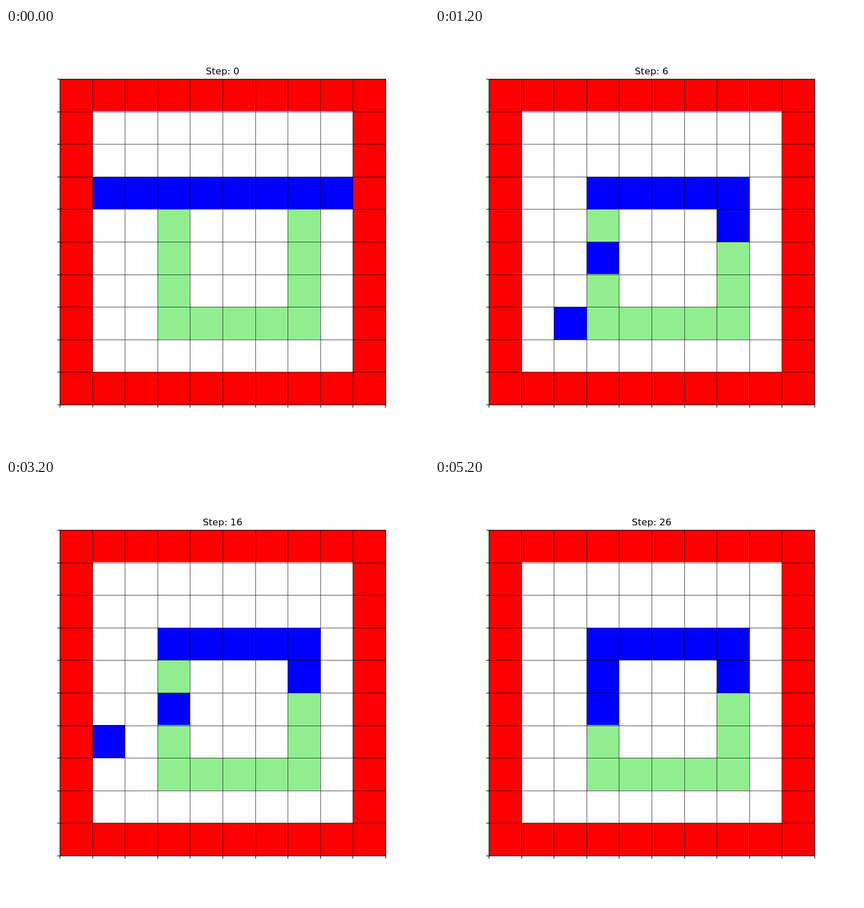
Recreate the animation shown at these times as an HTML page with a canvas. Size 748x748 px, loop 5400 ms.

```html
<!DOCTYPE html>
<html lang="en">
<head>
<meta charset="utf-8">
<title>Grid walkers</title>
<style>
  html, body { margin: 0; width: 100%; height: 100%; overflow: hidden; background: #fff; }
  canvas { display: block; }
</style>
</head>
<body>
<canvas width="748" height="748"></canvas>
<script>
const ctx = document.querySelector('canvas').getContext('2d');
const N = 10, CELL = 57.6, LEFT = 95, TOP = 90, SIZE = 576;
const STEP_MS = 200, STEPS = 27;

const lineX = i => Math.round(LEFT + i * CELL);
const lineY = i => Math.round(TOP + i * CELL);
// Cell edges sit one pixel above the grid line at rows 1 and 6.
const edgeY = i => lineY(i) - (i % 5 === 1 ? 1 : 0);

const DIRS = { U: [0, -1], D: [0, 1], L: [-1, 0], R: [1, 0] };
const walkers = [
  { start: [1, 3], moves: 'DRLRDR' },
  { start: [2, 3], moves: 'DDDDDUULRLDUDDUUUURDULRUDR' },
  ...[3, 4, 5, 6, 7].map(x => ({ start: [x, 3], moves: '' })),
  { start: [8, 3], moves: 'DL' }
];

function position({ start: [x, y], moves }, step) {
  for (const m of moves.slice(0, step)) {
    x += DIRS[m][0];
    y += DIRS[m][1];
  }
  return [x, y];
}

function block(x, y, w, h, color) {
  ctx.fillStyle = color;
  ctx.fillRect(lineX(x), edgeY(y), lineX(x + w) - lineX(x), edgeY(y + h) - edgeY(y));
}

function line(x1, y1, x2, y2, width) {
  ctx.lineWidth = width;
  ctx.beginPath();
  ctx.moveTo(x1, y1);
  ctx.lineTo(x2, y2);
  ctx.stroke();
}

function drawAxes() {
  const x0 = LEFT + 0.5, y0 = TOP + 0.5, x1 = x0 + SIZE, y1 = y0 + SIZE;
  ctx.strokeStyle = '#000';
  for (let i = 0; i <= N; i++) {
    const x = lineX(i) + 0.5, y = lineY(i) + 0.5;
    line(x, y0, x, y1, 0.69);
    line(x0, y, x1, y, 0.69);
    line(x, y1, x, y1 + 4.86, 1.11);
    line(x0 - 4.86, y, x0, y, 1.11);
  }
  ctx.strokeRect(x0, y0, SIZE, SIZE);
}

function draw(step) {
  ctx.fillStyle = '#fff';
  ctx.fillRect(0, 0, 748, 748);
  block(0, 0, N, N, '#f00');
  block(1, 1, 8, 8, '#fff');
  block(3, 4, 5, 4, '#90ee90');
  block(4, 4, 3, 3, '#fff');
  for (const w of walkers) block(...position(w, step), 1, 1, '#00f');
  drawAxes();
  ctx.fillStyle = '#000';
  ctx.font = '16.67px "DejaVu Sans", sans-serif';
  ctx.textAlign = 'center';
  ctx.fillText('Step: ' + step, LEFT + SIZE / 2, 82);
}

function tick() {
  draw(Math.floor(performance.now() / STEP_MS) % STEPS);
  requestAnimationFrame(tick);
}
tick();
</script>
</body>
</html>
```
